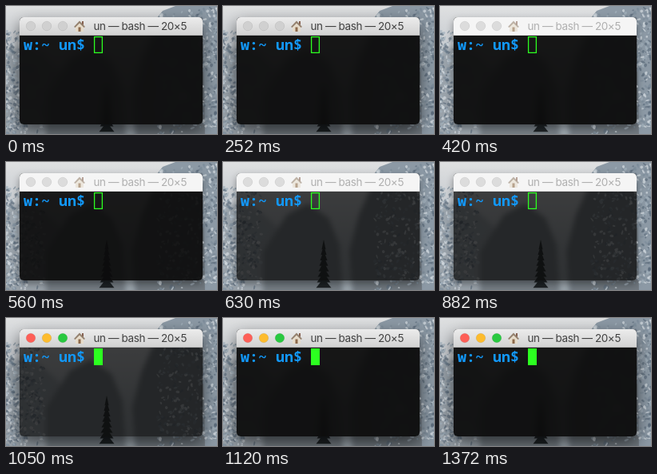
Animation, 264 px wide and 160 px high, one loop 1540 ms. Source, as an HTML page with a canvas:

```html
<!DOCTYPE html>
<html lang="en">
<head>
<meta charset="utf-8">
<title>Terminal focus</title>
<style>
html, body { margin: 0; width: 100%; height: 100%; overflow: hidden; background: #a7abb0; }
canvas { display: block; }
</style>
</head>
<body>
<canvas id="stage" width="264" height="160"></canvas>
<script>
const W = 264, H = 160, LOOP = 1540;
const ctx = document.getElementById('stage').getContext('2d');
const win = { x: 17, y: 14, w: 229, h: 134, bar: 23 };

// Each state holds from its time until the next one.
const states = [
  { at: 0,    active: true,  lights: false, solid: false, dark: .94, blur: true },
  { at: 420,  active: false, lights: false, solid: false, dark: .94, blur: true },
  { at: 560,  active: false, lights: false, solid: false, dark: .93, blur: false },
  { at: 630,  active: false, lights: false, solid: false, dark: .75, blur: false },
  { at: 1050, active: true,  lights: true,  solid: true,  dark: .75, blur: false },
  { at: 1120, active: true,  lights: true,  solid: true,  dark: .94, blur: true }
];

function randomizer(seed) {
  return () => (seed = (seed * 16807) % 2147483647) / 2147483647;
}

function polygon(c, color, ...pts) {
  c.fillStyle = color;
  c.beginPath();
  for (let i = 0; i < pts.length; i += 2) c.lineTo(pts[i], pts[i + 1]);
  c.closePath();
  c.fill();
}

function vertical(c, y0, y1, ...colors) {
  const g = c.createLinearGradient(0, y0, 0, y1);
  colors.forEach((color, i) => g.addColorStop(i / (colors.length - 1), color));
  return g;
}

function makeCanvas(draw) {
  const el = document.createElement('canvas');
  el.width = W;
  el.height = H;
  draw(el.getContext('2d'));
  return el;
}

function tree(c, x, top, height) {
  const tiers = 8;
  for (let i = 0; i < tiers; i++) {
    const y = top + i * height / tiers, half = 2.5 + i;
    polygon(c, '#1d2225', x, y - 3, x + half, y + height / 6, x - half, y + height / 6);
  }
}

// Small snow and rock patches, densest towards the outer edge.
function mottle(c, rnd, count, place) {
  const shades = ['#5d6c7c', '#7c8b9a', '#a3b0bc', '#d3dae0'];
  c.globalAlpha = .7;
  for (let i = 0; i < count; i++) {
    const [x, y] = place(rnd() ** 1.5, rnd());
    c.fillStyle = shades[Math.floor(rnd() * shades.length)];
    c.beginPath();
    c.ellipse(x, y, .7 + rnd() * 1.4, .8 + rnd() * 2.2, rnd() * 3, 0, 7);
    c.fill();
  }
  c.globalAlpha = 1;
}

// Misty valley between two snowy slopes.
const scene = makeCanvas(c => {
  const rnd = randomizer(71);
  c.fillStyle = vertical(c, 0, H, '#dfe0e1', '#c5cacf', '#a9b1b8', '#9ba5ad');
  c.fillRect(0, 0, W, H);
  c.filter = 'blur(3px)';
  polygon(c, '#99a2aa', -5, 58, 30, 48, 62, 76, 92, 110, 100, 165, -5, 165);
  polygon(c, '#737b82', 50, 112, 80, 66, 106, 52, 132, 70, 146, 104, 150, 165, 50, 165);
  polygon(c, '#6f777e', 158, 112, 170, 66, 186, 30, 200, 14, 270, 10, 270, 165, 162, 165);
  c.filter = 'blur(.5px)';
  polygon(c, '#8c99a5', 188, 16, 196, 6, 212, 0, 270, -5, 270, 165, 249, 165, 246, 20);
  mottle(c, rnd, 420, (u, v) => [u * 48, 32 + v * 128]);
  mottle(c, rnd, 480, (u, v) => [W - u * 74, u * 12 + v * 150]);
  tree(c, 126, 100, 55);
  c.filter = 'none';
});

const blurred = makeCanvas(c => {
  c.filter = 'blur(4px)';
  c.drawImage(scene, 0, 0);
});

function windowPath() {
  ctx.beginPath();
  ctx.roundRect(win.x, win.y, win.w, win.h, 5);
}

function drawShadow(active) {
  ctx.save();
  ctx.beginPath();
  ctx.rect(0, 0, W, H);
  ctx.roundRect(win.x, win.y, win.w, win.h, 5);
  ctx.clip('evenodd');
  ctx.shadowColor = active ? 'rgba(0,0,0,.6)' : 'rgba(0,0,0,.4)';
  ctx.shadowBlur = active ? 20 : 10;
  ctx.shadowOffsetY = active ? 8 : 4;
  ctx.fillStyle = '#000';
  windowPath();
  ctx.fill();
  ctx.restore();
}

function drawHouse(alpha) {
  ctx.globalAlpha = alpha;
  polygon(ctx, '#85604f', 95, 19, 97, 19, 97, 24, 95, 23);
  polygon(ctx, '#e6dccb', 87, 25, 92, 20, 97, 25, 97, 32, 87, 32);
  polygon(ctx, '#8d6a4c', 90.5, 26.5, 93.5, 26.5, 93.5, 32, 90.5, 32);
  polygon(ctx, '#94816f', 85, 26, 92, 18.5, 99, 26, 97.5, 27, 92, 21.5, 86.5, 27);
  ctx.globalAlpha = 1;
}

function drawBar({ active, lights }) {
  ctx.fillStyle = active
    ? vertical(ctx, win.y, win.y + win.bar, '#ececec', '#d1d1d1')
    : '#f5f5f5';
  ctx.fillRect(win.x, win.y, win.w, win.bar);
  ctx.fillStyle = active ? '#b0b0b0' : '#d5d5d5';
  ctx.fillRect(win.x, win.y + win.bar - 1, win.w, 1);

  const gray = active ? '#d0d0d0' : '#dcdcdc';
  const fills = lights ? ['#fe5f57', '#fdbc2e', '#29c940'] : [gray, gray, gray];
  fills.forEach((fill, i) => {
    ctx.beginPath();
    ctx.arc(31 + i * 20, 25, 5.8, 0, 7);
    ctx.fillStyle = fill;
    ctx.fill();
    ctx.lineWidth = .8;
    ctx.strokeStyle = 'rgba(0,0,0,.1)';
    ctx.stroke();
  });

  drawHouse(active ? 1 : .55);
  ctx.font = '13.5px Inter, sans-serif';
  ctx.letterSpacing = '-.4px';
  ctx.textAlign = 'right';
  ctx.fillStyle = active ? '#414141' : '#b0b0b0';
  ctx.fillText('un — bash — 20×5', 226, 30);
  ctx.letterSpacing = '0px';
}

function drawPrompt(solid) {
  ctx.font = '600 18.33px "Noto Sans Mono", monospace';
  ctx.textAlign = 'left';
  ctx.fillStyle = '#1299fb';
  ctx.fillText('w:~ un$', 22, 55);
  ctx.fillStyle = ctx.strokeStyle = '#2cff20';
  ctx.lineWidth = 1.3;
  if (solid) ctx.fillRect(110, 38, 11, 21);
  else ctx.strokeRect(110.6, 38.6, 9.8, 19.8);
}

function draw(t) {
  const s = states.findLast(state => state.at <= t);
  ctx.drawImage(scene, 0, 0);
  drawShadow(s.active);
  ctx.save();
  windowPath();
  ctx.clip();
  ctx.drawImage(s.blur ? blurred : scene, 0, 0);
  ctx.fillStyle = `rgba(11,11,11,${s.dark})`;
  ctx.fillRect(win.x, win.y, win.w, win.h);
  drawBar(s);
  drawPrompt(s.solid);
  ctx.restore();
}

const start = performance.now();
function tick() {
  draw((performance.now() - start) % LOOP);
  requestAnimationFrame(tick);
}
tick();
</script>
</body>
</html>
```
